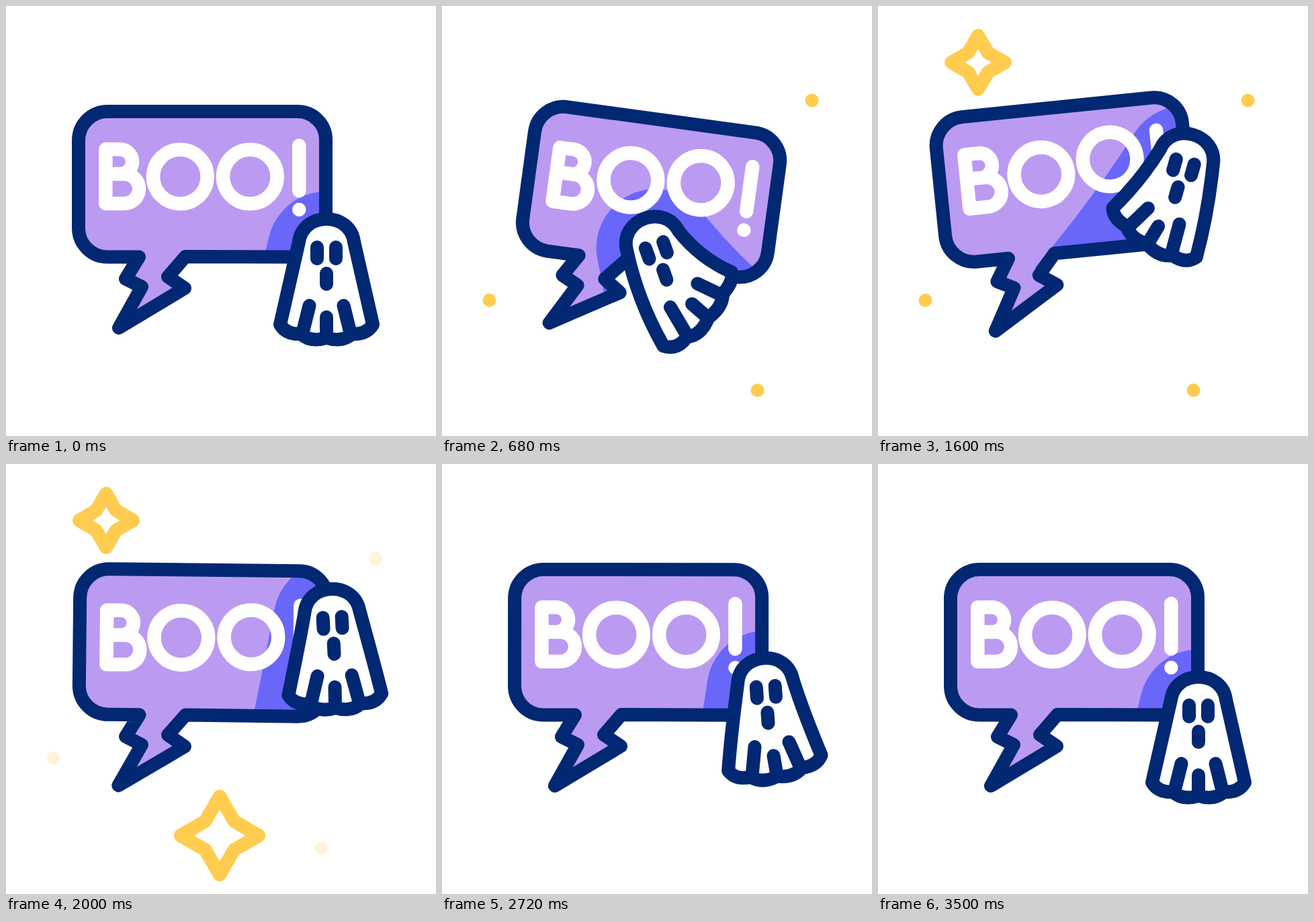
These frames come from a looping animation (640x640 px, 3600 ms). An HTML page:

```html
<!DOCTYPE html>
<html lang="en">
<head>
<meta charset="utf-8">
<title>Boo!</title>
<style>
  html, body { margin: 0; width: 100%; height: 100%; overflow: hidden; background: #fff; }
  svg { display: block; width: 100%; height: 100%; }
  .line { fill: none; stroke-width: 20; stroke-linecap: round; stroke-linejoin: round; }
  .navy { stroke: #022873; }
  .white { stroke: #fff; stroke-width: 20.5; }
  .gold { stroke: #ffcc4f; }
  #dots { fill: #ffcc4f; }
</style>
</head>
<body>
<svg viewBox="0 0 640 640" role="img" aria-label="BOO!">
  <defs>
    <path id="shape" d="M198 373.5H151A43 43 0 0 1 108 331V200A43 43 0 0 1 151 157H434A42 42 0 0 1 476 200V331A42 42 0 0 1 434 373.5L267 373L241 403L266 420L168 479L202 418L178 406Z"/>
    <clipPath id="inside"><use class="turn" href="#shape"/></clipPath>
  </defs>
  <g id="dots">
    <circle cx="550.5" cy="140.5" r="10"/>
    <circle cx="70.5" cy="438" r="10"/>
    <circle cx="469.5" cy="572" r="10"/>
  </g>
  <path class="line gold star" transform="translate(149 84)"/>
  <path class="line gold star" transform="translate(318 553)"/>
  <use class="turn" href="#shape" fill="#bb9af2"/>
  <g clip-path="url(#inside)"><path id="shadow" fill="#6966fa"/></g>
  <g class="turn">
    <path class="line white letter" d="M148.3 250H176A22 22 0 0 1 176 294H148.3V213.3H171A18.4 18.4 0 0 1 171 250"/>
    <circle class="line white letter" cx="259.3" cy="254" r="40.3"/>
    <circle class="line white letter" cx="363.3" cy="254" r="40.3"/>
    <path class="line white letter" d="M436.3 207.8V275M436.3 303v.01"/>
    <use class="line navy" href="#shape"/>
  </g>
  <path id="sheet" class="line navy" style="fill:#fff"/>
  <path id="folds" class="line navy"/>
  <path id="face" class="line navy" d="M-14 0V17M14 0V17M0 39V55"/>
</svg>
<script>
const LOOP = 3600, RAD = Math.PI / 180;
const $ = id => document.getElementById(id);
const all = name => [...document.querySelectorAll('.' + name)];
const clamp = p => Math.min(1, Math.max(0, p));
const ease = p => (1 - Math.cos(Math.PI * clamp(p))) / 2;

// Sine-eased swing from one turning point [time, value] to the next.
const swing = (...turns) => t => turns.slice(1).reduce((v, [end, to], i) => {
  const [start, from] = turns[i];
  return v + (to - from) * ease((t - start) / (end - start));
}, turns[0][1]);

const tilt = swing([100, 0], [700, 7.8], [1560, -5.9], [2200, 2.4], [3210, -2.1], [3500, 0]);
const headX = swing([100, 477], [850, 294], [1850, 485], [2420, 489], [2950, 477]);
const headY = swing([100, 359], [400, 370], [1780, 226], [2000, 228], [3040, 359]);
const lean = swing([100, 0], [650, 20], [1130, -28], [2400, 12], [3040, -4], [3210, 7], [3500, 0]);
const curl = swing([100, 0], [700, 29], [1600, -15], [2420, 12], [3000, 0]);
const hop = swing([0, 0], [100, -12], [280, 5], [700, 0]);

// Letters hop left to right, then right to left.
const letterY = (i, t) => hop(t - 380 - 100 * i) + hop(t - 1700 + 100 * i);

// Three soft blinks.
function blink(t) {
  const n = (t - 230) / 830;
  return n > 0 && n < 3 ? clamp(1.3 * Math.sin(Math.PI * n) ** 2) : 0;
}

// A star pops up, breathes once and vanishes.
function drawStar(node, age, reach) {
  const left = 1100 - age;
  const pop = Math.sin(clamp(Math.min(age / 300, left / 150)) * Math.PI / 2);
  const r = reach * pop * (.9 + .1 * Math.cos(2 * Math.PI * Math.max(0, age - 300) / 800));
  const points = Array.from({ length: 8 }, (_, i) => {
    const d = i % 2 ? r * .52 : r, a = i * Math.PI / 4;
    return d * Math.cos(a) + ' ' + d * Math.sin(a);
  });
  node.setAttribute('d', 'M' + points.join('L') + 'Z');
  node.setAttribute('opacity', clamp(Math.min(age / 150, left / 100)));
}

// Maps points along the bent body: u across, v down; the inner side bends more.
const bender = (x, y, base, bend) => (u, v) => {
  const k = Math.max(v, 0) / 115;
  const along = (base + (bend + Math.abs(bend) * u * .003) * k / 2) * RAD;
  const across = (base + bend * k) * RAD;
  return [x + v * Math.sin(along) + u * Math.cos(across),
          y + v * Math.cos(along) - u * Math.sin(across)].map(n => n.toFixed(2)).join(' ');
};

// Right half of the sheet as joined cubic curves, then mirrored.
const half = [[0, -42], [20, -42], [38, -30], [41, -8], [50, 33], [60, 74], [69, 115],
  [63, 125], [53, 130], [38, 129], [27, 139], [13, 139], [0, 135]];
const outline = [...half, ...half.slice(0, -1).reverse().map(([u, v]) => [-u, v])];
const foldLines = [-1, 0, 1].map(s => s ? [[s * 25.5, 87], [s * 34.5, 123]] : [[0, 104], [0, 132]]);

function sheetPath(map) {
  const [first, ...rest] = outline.map(p => map(...p));
  return `M${first}C${rest.join(' ')}Z`;
}

const foldPath = map => foldLines.map(([a, b]) => `M${map(...a)}L${map(...b)}`).join('');

// Round head with sides flaring downwards.
function shadowPath(map) {
  const r = 88, a = 13.5 * RAD, c = Math.cos(a), s = Math.sin(a);
  const side = (dir, d) => map(dir * (r * c + d * s), 5 - r * s + d * c);
  return `M${side(-1, 260)}Q${side(-1, 130)} ${side(-1, 0)}A${r} ${r} 0 0 1 ${side(1, 0)}`
    + `Q${side(1, 130)} ${side(1, 260)}Z`;
}

const turning = all('turn'), letters = all('letter'), stars = all('star');

function draw(t) {
  turning.forEach(n => n.setAttribute('transform', `rotate(${tilt(t)} 218 414)`));
  letters.forEach((n, i) => n.setAttribute('transform', `translate(0 ${letterY(i, t)})`));

  const x = headX(t), y = headY(t), base = lean(t), bend = curl(t);
  const body = bender(x, y, base, bend);
  $('sheet').setAttribute('d', sheetPath(body));
  $('folds').setAttribute('d', foldPath(body));
  $('face').setAttribute('transform', `translate(${x} ${y}) rotate(${-base})`);
  $('shadow').setAttribute('d', shadowPath(bender(x, y, base, bend * .3)));

  $('dots').setAttribute('opacity', blink(t));
  stars.forEach((n, i) => drawStar(n, t - 1000 - 600 * i, 48 + 12 * i));
}

function tick() {
  draw(performance.now() % LOOP);
  requestAnimationFrame(tick);
}
tick();
</script>
</body>
</html>
```
